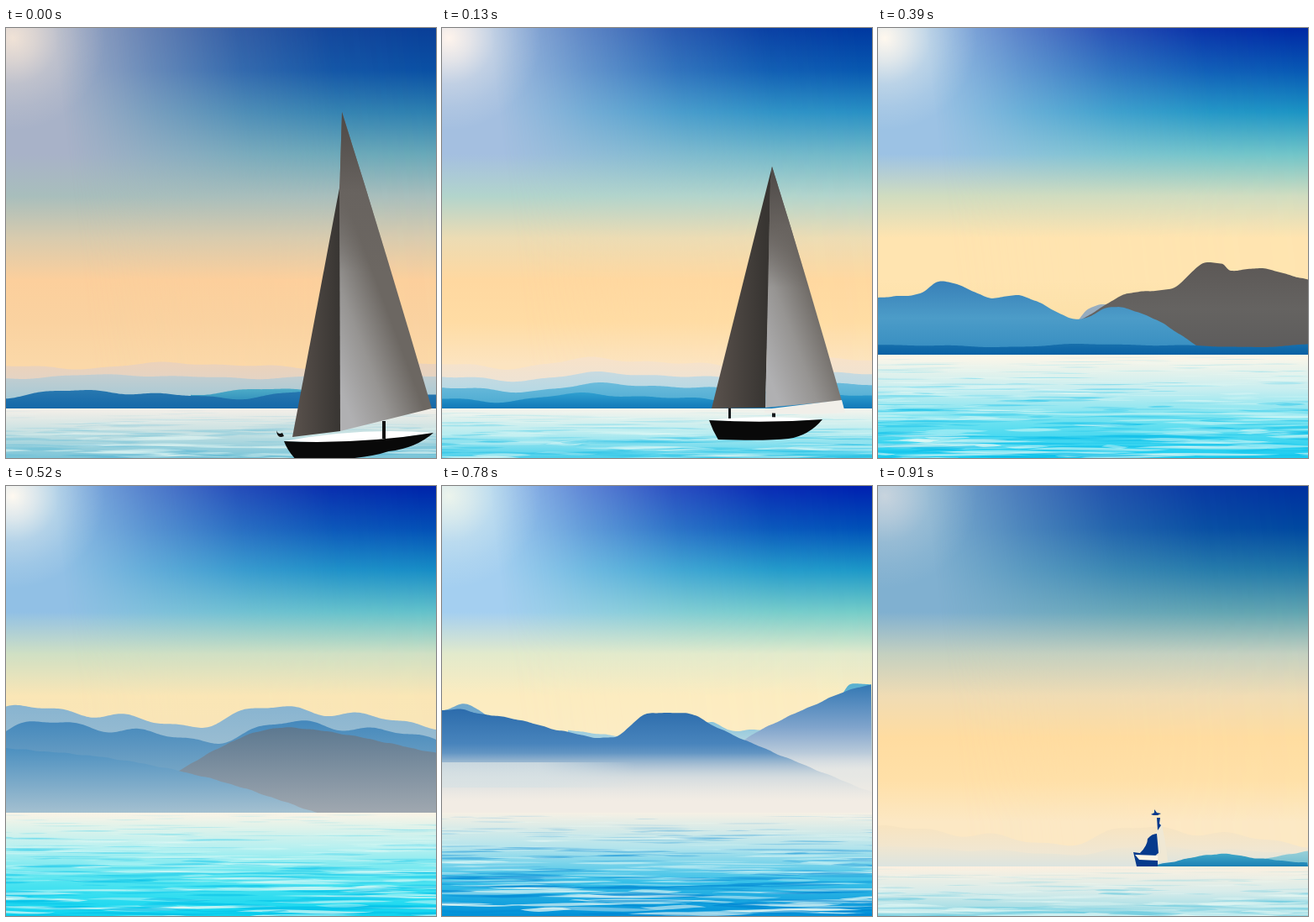
Recreate the animation shown at these times as an HTML page with a canvas. Size 512x512 px, loop 1040 ms.

```html
<!DOCTYPE html>
<html lang="en">
<head>
<meta charset="utf-8">
<title>Sea and mountains</title>
<style>
html, body { margin: 0; width: 100%; height: 100%; overflow: hidden; }
canvas { display: block; width: 512px; height: 512px; }
</style>
</head>
<body>
<canvas id="stage" width="512" height="512"></canvas>
<script>
const SIZE = 512, STEP = 130;

// glow: sun; haze: upper left; deep to teal: upper right going down; tint to low: down to the horizon.
const SKIES = {
  dusk: { glow: 'f0e2d6', haze: 'a8b2c8', right: '0a3f98 0a50a4 2d80b0 68a8b8', tint: 'a8bebc', low: 'd8cbae fccf9c fad2a0 fbd8a8' },
  warm: { glow: 'fff4ec', haze: 'a4bfe0', right: '0038a0 0858b0 2890c4 70b8c8', tint: 'b2d4cc', low: 'ecdcb4 ffd8a0 ffdca4 fce4c0' },
  day: { glow: 'fff8ee', haze: '9cc2e4', right: '0028a4 0858b4 1c94c4 70c4c8', tint: 'd0dcc0', low: 'ffe4b0 ffe4b0 fce0a8 fce0a8' },
  clear: { glow: 'fffaf2', haze: '88c0e6', right: '0020b0 0048b8 1488c8 58c0cc', tint: 'd0e4c8', low: 'f6e8bc f4e6c0 f0e4c4 f0e4c4' },
  mist: { glow: 'ecf4ec', haze: 'a4cff0', right: '0020b0 0050b8 1c98c8 74ccc8', tint: 'e2eacc', low: 'fcecc0 fcecc4 f4ece0 f4ece0' },
  gold: { glow: 'c8d4de', haze: '80b0d0', right: '0030a0 0048a0 2078a8 60a4b0', tint: 'c4d0c0', low: 'f0dcb4 ffdca0 ffe0a8 fce8c4' }
};

function layer() {
  const c = document.createElement('canvas');
  c.width = c.height = SIZE;
  return c.getContext('2d');
}

function fill(g, stops, colors) {
  colors.split(' ').forEach((c, i, all) => stops.addColorStop(i / (all.length - 1), '#' + c));
  return g.fillStyle = stops;
}

const linear = (g, x0, y0, x1, y1, colors) => fill(g, g.createLinearGradient(x0, y0, x1, y1), colors);
const radial = (g, x, y, r, colors) => fill(g, g.createRadialGradient(x, y, 0, x, y, r), colors);

function shape(g, d) {
  g.fill(new Path2D(d));
}

function seeded(seed) {
  return () => (seed = (seed * 16807) % 2147483647) / 2147483647;
}

function sky(g, { glow, haze, right, tint, low }, alpha = 1) {
  const left = layer(), blue = layer();
  linear(left, 0, 0, 0, 400, `${haze} ${haze} ${haze} ${haze} ${tint} ${low}`);
  left.fillRect(0, 0, SIZE, SIZE);
  linear(blue, 0, 0, 0, 400, `${right} ${tint} ${low}`);
  blue.fillRect(0, 0, SIZE, SIZE);
  blue.globalCompositeOperation = 'destination-in';
  linear(blue, 60, 30, 490, -20, '0000 0006 000b 000e 000f');
  blue.fillRect(0, 0, SIZE, SIZE);
  left.drawImage(blue.canvas, 0, 0);
  radial(left, 8, 12, 110, `${glow} ${glow}b0 ${glow}50 ${glow}20 ${glow}00`);
  left.fillRect(0, 0, 120, 125);
  g.globalAlpha = alpha;
  g.drawImage(left.canvas, 0, 0);
  g.globalAlpha = 1;
}

// Fills below the height given by y(x).
function land(g, base, colors, y, x0 = 0, x1 = SIZE) {
  let top = base;
  const path = new Path2D();
  path.moveTo(x0, base);
  for (let x = x0; x <= x1; x += 2) {
    const h = Math.min(y(x), base);
    top = Math.min(top, h);
    path.lineTo(x, h);
  }
  path.lineTo(x1, base);
  linear(g, 0, top, 0, base, colors);
  g.fill(path);
}

// Rolling hills from three waves.
function hills(g, base, colors, level, amp, phase, x0, x1) {
  land(g, base, colors, x => level - amp *
    (Math.sin(x / 47 + phase) + 0.5 * Math.sin(x / 23 + 2 * phase) + 0.25 * Math.sin(x / 11 + 3 * phase)), x0, x1);
}

// A curve through key points, slightly roughened.
function ridge(g, base, colors, keys) {
  const pts = keys.split(' ').map(p => p.split(',').map(Number));
  const at = i => pts[Math.max(0, Math.min(pts.length - 1, i))];
  const slope = i => (at(i + 1)[1] - at(i - 1)[1]) / (at(i + 1)[0] - at(i - 1)[0]);
  land(g, base, colors, x => {
    let i = 0;
    while (i < pts.length - 2 && x > pts[i + 1][0]) i++;
    const [xa, ya] = pts[i], [xb, yb] = pts[i + 1];
    const w = xb - xa, t = (x - xa) / w, s = t * t * (3 - 2 * t);
    return ya + (yb - ya) * s + w * t * (1 - t) * ((1 - t) * slope(i) - t * slope(i + 1)) +
      0.6 * Math.sin(x / 5) * Math.sin(x / 17);
  }, pts[0][0], pts[pts.length - 1][0]);
}

function sea(g, y0, colors, dark, strength, seed) {
  const rnd = seeded(seed), depth = SIZE - y0;
  linear(g, 0, y0, 0, SIZE, colors);
  g.fillRect(0, y0, SIZE, depth);
  for (let i = 0; i < depth * 3; i++) {
    const d = rnd(), x = rnd() * 620 - 60, y = y0 + 3 + d * depth;
    const len = 15 + rnd() * (30 + 60 * d), h = 0.6 + d * 3 * rnd();
    const bend = (rnd() - 0.5) * 8 * d;
    g.globalAlpha = strength * (0.2 + 0.8 * d) * (0.5 + 0.5 * rnd());
    g.fillStyle = rnd() < 0.5 ? '#f0fcf6' : dark;
    g.beginPath();
    g.moveTo(x - len, y);
    g.bezierCurveTo(x - len / 3, y + bend - h, x + len / 3, y - bend - h, x + len, y);
    g.bezierCurveTo(x + len / 3, y - bend + h, x - len / 3, y + bend + h, x - len, y);
    g.fill();
  }
  g.globalAlpha = 1;
}

// tip, jib (top of the front sail), left, foot and right are sail corners; bow and stern end the hull.
function sailboat(g, { tip, jib = tip, left, foot, right, bow, stern, draft, deck }) {
  const [fx, fy] = foot, w = stern[0] - bow[0], mid = bow[0] + w / 2;
  linear(g, left[0], 0, fx, 0, '5a524d 383532');
  shape(g, `M${jib}L${left}L${foot}Z`);
  const sail = `M${tip}Q${(tip[0] + right[0]) / 2 + 2} ${(tip[1] + right[1]) / 2} ${right}L${foot}L${jib[0] - 2} ${jib[1] + 20}Z`;
  linear(g, fx, fy - 50, fx + 80, fy - 80, 'b0b0b2 969492 6c6762');
  shape(g, sail);
  linear(g, 0, tip[1], 0, tip[1] + (fy - tip[1]) * 0.5, '4c4846 68635f 68635f00');
  shape(g, sail);
  g.fillStyle = '#fff';
  shape(g, `M${bow}Q${mid} ${bow[1] - deck} ${stern}L${mid} ${bow[1] + 3}Z`);
  g.fillStyle = '#090909';
  shape(g, `M${bow}Q${mid} ${bow[1] + 4} ${stern}Q${stern[0] - w * 0.12} ${stern[1] + draft * 0.85} ` +
    `${stern[0] - w * 0.3} ${stern[1] + draft}Q${mid} ${bow[1] + draft + 2} ${bow[0] + w * 0.08} ${bow[1] + draft}Q${bow[0] + 4} ${bow[1] + draft / 2} ${bow}Z`);
}

function tinyBoat(g) {
  g.fillStyle = '#f0e8d4';
  shape(g, 'M337 400Q343 425 345 447L328 448L331 412Z');
  g.fillStyle = '#063a8c';
  shape(g, 'M332 414L334 437L330 440L312 437Q321 428 321 420Q326 414 332 414Z' +
    'M332 395h4l-1 7 2 2-4 6ZM329 385l3 4 5 1-4 2h-5l-3-1 4-2ZM304 436L333 440V453H308Z');
  g.fillStyle = '#fff6e6';
  shape(g, 'M306 439L333 440L333 446L311 445Z');
}

const scenes = [
  g => {
    sky(g, SKIES.dusk);
    hills(g, 453, 'ecd2ba d8d6d2', 402, 3, 3.3);
    hills(g, 453, 'c4ced0 9cc8d8', 415, 2, 5);
    hills(g, 453, '4eacc8 2080b4', 433, 3, 0.6, 220);
    hills(g, 453, '2878b0 1468a8', 436, 4, -0.66);
    sea(g, 453, 'f6efe8 c4e0e2 78c4d8', '#5cb8d4', 0.6, 11);
    sailboat(g, {
      tip: [400, 100], jib: [399, 180], left: [341, 487], foot: [398, 480], right: [507, 453],
      bow: [331, 492], stern: [509, 482], draft: 22, deck: 17
    });
    g.fillStyle = '#111';
    shape(g, 'M448 468h4v21h-4ZM322 479q2 6 7 3l2 4q-8 4-9-7Z');
  },
  g => {
    sky(g, SKIES.warm);
    hills(g, 453, 'f8e2c8 e4e4e0', 399, 5, 3.5);
    hills(g, 453, 'c8dae0 a8d8e8', 415, 4, 3.3);
    hills(g, 453, '6cbcdc 48a8d0', 428, 4, 3.2);
    hills(g, 453, '30a0d0 1078b8', 440, 4, 3.8);
    sea(g, 453, 'f8f4ec b8ecf0 48d0ec', '#28c0e4', 0.65, 23);
    g.fillStyle = '#15191c';
    shape(g, 'M341 450h3v20h-3ZM393 454h4v16h-4Z');
    sailboat(g, {
      tip: [393, 165], left: [321, 453], foot: [385, 452], right: [476, 444],
      bow: [318, 467], stern: [453, 466], draft: 23, deck: 7
    });
    g.fillStyle = '#f1efe9';
    shape(g, 'M384 454L476 443L480 458Q430 461 384 458Z');
  },
  g => {
    sky(g, SKIES.warm);
    sky(g, SKIES.day, 0.5);
    hills(g, 422, 'b4ccd4 94c4d8', 368, 9, 0.3);
    hills(g, 422, '489cc8 2c88bc', 388, 6, 0);
    hills(g, 422, '1c74b0 1068a8', 408, 2, 1);
    sea(g, 422, 'fcf4e8 a8e8f0 30cfee', '#18bce4', 0.65, 31);
    sailboat(g, {
      tip: [395, 230], left: [318, 421], foot: [388, 421], right: [484, 416],
      bow: [322, 431], stern: [450, 430], draft: 21, deck: 7
    });
  },
  g => {
    sky(g, SKIES.day);
    ridge(g, 389, '98aec0 88a0b8', '238,349 250,335 268,329 300,335');
    ridge(g, 389, '5c5856 656361 5c5b5b', '240,349 295,317 352,309 386,281 410,281 419,289 455,286 512,300');
    ridge(g, 389, '3880b8 4c9cc8 348cc0', '0,321 50,316 70,303 88,303 133,321 172,319 238,347 278,332 330,347 395,389');
    hills(g, 389, '1870ac 0860a4', 378, 1.5, 2);
    sea(g, 389, 'fff6e8 c8eef0 68e0f0 18ccf0', '#08bce8', 0.7, 47);
  },
  g => {
    sky(g, SKIES.day);
    sky(g, SKIES.clear, 0.5);
    hills(g, 389, '88b4d0 b8ccd4', 274, 10, 0.5);
    hills(g, 389, '4488bc 9cbccc', 292, 10, 0);
    ridge(g, 389, '5c7890 a0a8b0', '130,389 235,322 310,290 380,292 512,318');
    ridge(g, 389, '4c90c0 a4c0d0', '0,312 130,325 250,350 370,389');
    sea(g, 389, 'fcf4e6 b8f0f0 50e4f0 0cd4f0', '#04c0e8', 0.75, 59);
  },
  g => {
    sky(g, SKIES.clear);
    ridge(g, 389, '60a0cc b0ccd8', '0,252 53,229 85,249 106,243 125,256 170,246 180,257 245,274 300,389');
    ridge(g, 389, '78acd0 c4d8cc d0d0d4', '235,290 262,262 318,241 362,235 381,258 415,246 440,250 512,240');
    ridge(g, 389, '4888c0 98b4cc c4c8d0', '0,246 62,236 128,260 155,254 240,284 330,389');
    ridge(g, 389, '3c80b8 90a8c4 d4d0d4', '290,290 330,278 395,278 460,260 492,237 512,250');
    ridge(g, 389, '5090c0 a0b8d0 c8d0d8', '0,260 130,287 210,320 300,389');
    ridge(g, 389, '4c84b2 94a8c2 bebec8 d4d2d6', '120,389 190,324 240,290 290,266 318,271 345,295 512,375');
    radial(g, 395, 382, 120, 'f8f4f4e0 f0ecf000');
    g.fillRect(270, 260, 242, 129);
    sea(g, 389, 'f8f4ea c0f2f0 50e8f0 08dcf4', '#00c8ec', 1, 71);
  },
  g => {
    sky(g, SKIES.mist);
    ridge(g, 389, '88c4dc e8ece4 f0ece4', '150,291 260,300 320,281 342,291 380,291 430,310');
    ridge(g, 389, '58b0d0 e0e4e4', '475,250 486,236 512,237');
    ridge(g, 389, '3478b4 80a4cc e0e4e4 f0ece4', '335,320 375,293 440,262 490,241 512,237');
    ridge(g, 389, '70a8cc 90b8d0', '0,268 30,260 60,278');
    ridge(g, 389, '2c6cac 4884bc a8c0d4 ece8e4', '0,267 22,266 45,271 90,278 140,291 205,299 238,274 261,270 302,273 320,284 385,313 512,365');
    linear(g, 0, 318, 0, 375, 'f0ece400 e8e8e4b0 f2ece4');
    g.fillRect(0, 318, SIZE, 71);
    linear(g, 0, 0, 230, 0, 'd8e2e4c0 d8e2e4c0 d8e2e400');
    g.fillRect(0, 329, 230, 30);
    sea(g, 389, 'f6f0e4 b4e4ec 38c0e8 0090d8', '#0088d4', 0.85, 83);
  },
  g => {
    sky(g, SKIES.gold);
    hills(g, 453, 'f8e4c0 ece8dc', 416, 9, 0.6);
    hills(g, 453, 'f0e6d0 dce4e0', 434, 4, 0.4);
    ridge(g, 453, '98d0d8 70bcd0', '440,450 480,440 512,435');
    ridge(g, 453, '40a8c8 1c80b4', '333,451 388,440 412,438 450,443 512,449');
    sea(g, 453, 'fcf0e0 d8ecea 90d8e4', '#58c4dc', 0.6, 97);
    tinyBoat(g);
  }
];

const frames = scenes.map(draw => {
  const g = layer();
  draw(g);
  return g.canvas;
});

const stage = document.getElementById('stage').getContext('2d');
const start = performance.now();
let shown = -1;

function tick() {
  const i = Math.floor((performance.now() - start) / STEP) % frames.length;
  if (i !== shown) stage.drawImage(frames[shown = i], 0, 0);
  requestAnimationFrame(tick);
}
tick();
</script>
</body>
</html>
```
